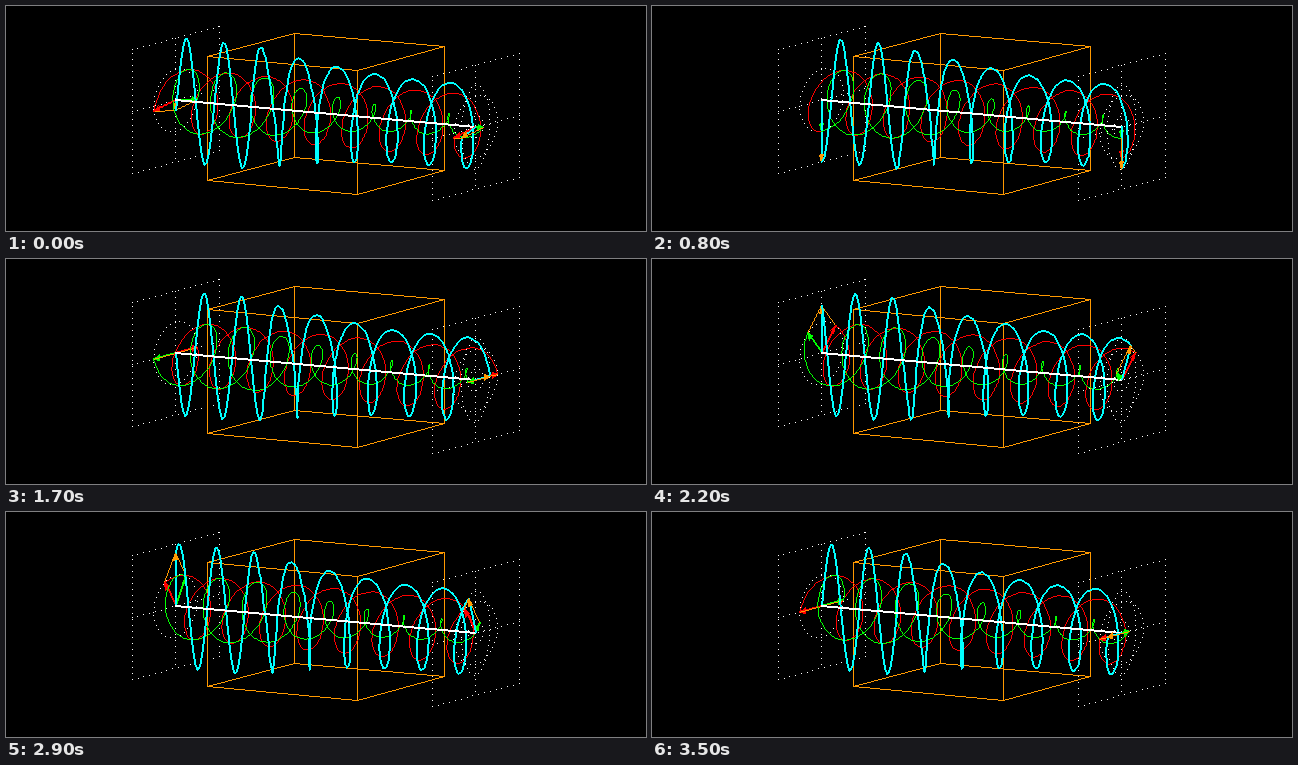
Recreate the animation shown at these times as a matplotlib script. Size 640 by 225 pixels, loop 3600 ms.

```python
import numpy as np
import matplotlib.pyplot as plt
from matplotlib.animation import FuncAnimation

W, H, DPI = 640, 225, 100
FRAMES, INTERVAL = 36, 100

LEFT, RIGHT = np.array([169.6, 94.2]), np.array([469.7, 121.2])
SIDE, UP = np.array([43.5, -11.75]), np.array([0, -62])
LENGTH = 300
WAVELENGTH = 37.5
ENTRY, EXIT = 75, 225      # absorbing medium along the axis
ABSORPTION = 0.007

WHITE, RED, GREEN = (255, 255, 255), (255, 0, 0), (0, 255, 0)
CYAN, ORANGE = (0, 255, 255), (255, 153, 0)

SQUARE = np.array([(-1, 1), (1, 1), (1, -1), (-1, -1), (-1, 1)])


def project(s, u, v):
    """Map axis position s and transverse coordinates u, v to pixels."""
    s, u, v = np.broadcast_arrays(s, u, v)
    base = LEFT + np.multiply.outer(s / LENGTH, RIGHT - LEFT)
    return base + np.multiply.outer(u, SIDE) + np.multiply.outer(v, UP)


def stroke(canvas, pts, color, width=1):
    """Hard-edged polyline, width measured across each segment's main axis."""
    cells = np.floor(np.asarray(pts) - (width - 1) / 2).astype(int)
    for a, b in zip(cells, cells[1:]):
        dx, dy = abs(b - a)
        n = max(dx, dy)
        xy = np.rint(np.linspace(a, b, n + 1)).astype(int)
        for i in range(width):
            ox, oy = (i, 0) if dy > dx else (0, i)
            canvas[xy[:, 1] + oy, xy[:, 0] + ox] = color


def dots(canvas, pts, gap):
    """Single pixels spaced evenly along a polyline."""
    dist = np.r_[0, np.cumsum(np.hypot(*np.diff(pts, axis=0).T))]
    at = np.arange(0, dist[-1], gap)
    x, y = (np.interp(at, dist, pts[:, i]).astype(int) for i in (0, 1))
    canvas[y, x] = WHITE


def green_amp(s):
    return 0.5 * np.exp(-ABSORPTION * (np.clip(s, ENTRY, EXIT) - ENTRY))


def fields(s, frame):
    """Transverse vectors of the two circular waves and their sum."""
    a = 2 * np.pi * (s / WAVELENGTH - (frame + 1) / FRAMES)
    g = green_amp(s)
    green = np.array([g * np.cos(a), g * np.sin(a)])
    red = np.array([-0.5 * np.cos(a), 0.5 * np.sin(a)])
    return red, green, red + green


def draw_screen(canvas, s):
    for a, b in zip(SQUARE, SQUARE[1:]):
        dots(canvas, project(s, *np.array([a, b]).T), 6)
    dots(canvas, project(s, np.zeros(2), np.array([1, -1])), 6)
    dots(canvas, project(s, np.array([-1, 1]), np.zeros(2)), 6)
    a = np.linspace(0, 2 * np.pi, 200)
    g = green_amp(s)
    radii = [(0.5, 0.5)]
    if g < 0.5:
        radii += [(g, g), (0.5 - g, 0.5 + g)]
    for ru, rv in radii:
        dots(canvas, project(s, -ru * np.cos(a), rv * np.sin(a)), 5)


def draw_box(canvas):
    for s in (ENTRY, EXIT):
        stroke(canvas, project(s, *SQUARE.T), ORANGE)
    for u, v in SQUARE[:4]:
        stroke(canvas, project(np.array([ENTRY, EXIT]), u, v), ORANGE)


def draw_shaft(canvas, s, vec, color):
    stroke(canvas, project(s, *np.array([(0, 0), vec]).T), color, 2)


def draw_head(canvas, s, vec, color):
    size = np.hypot(*vec)
    if size < 1e-6:
        return
    along = vec / size * min(0.12, size)
    across = np.array([-along[1], along[0]])
    for k in np.linspace(-0.4, 0.4, 7):
        ends = np.array([vec, vec - along + k * across])
        stroke(canvas, project(s, *ends.T), color)


def draw_vectors(canvas, s, frame, sum_on_top):
    """Component arrows, their sum and the closing parallelogram."""
    red, green, total = fields(s, frame)
    for vec, color in ((red, RED), (green, GREEN)):
        draw_shaft(canvas, s, vec, color)
        draw_head(canvas, s, vec, color)
    closing = project(s, *np.array([red, total, green]).T)
    if sum_on_top:
        stroke(canvas, closing, ORANGE)
        draw_shaft(canvas, s, total, CYAN)
    else:
        draw_shaft(canvas, s, total, CYAN)
        stroke(canvas, closing, ORANGE)
    draw_head(canvas, s, total, ORANGE)


backdrop = np.zeros((H, W, 3), np.uint8)
draw_screen(backdrop, 0)
draw_screen(backdrop, LENGTH)
draw_box(backdrop)
path = np.linspace(0, LENGTH, 301)

fig = plt.figure(figsize=(W / DPI, H / DPI), dpi=DPI, facecolor="black")
ax = fig.add_axes([0, 0, 1, 1])
ax.axis("off")
stage = ax.imshow(backdrop, interpolation="nearest", aspect="auto")


def update(frame):
    canvas = backdrop.copy()
    draw_vectors(canvas, 0, frame, sum_on_top=True)
    for (u, v), color, width in zip(fields(path, frame),
                                    (RED, GREEN, CYAN), (1, 1, 2)):
        stroke(canvas, project(path, u, v), color, width)
    stroke(canvas, [LEFT, RIGHT], WHITE, 2)
    draw_vectors(canvas, LENGTH, frame, sum_on_top=False)
    stage.set_data(canvas)
    return [stage]


anim = FuncAnimation(fig, update, frames=FRAMES, interval=INTERVAL,
                     repeat=True, repeat_delay=0, blit=False)
plt.show()
```
